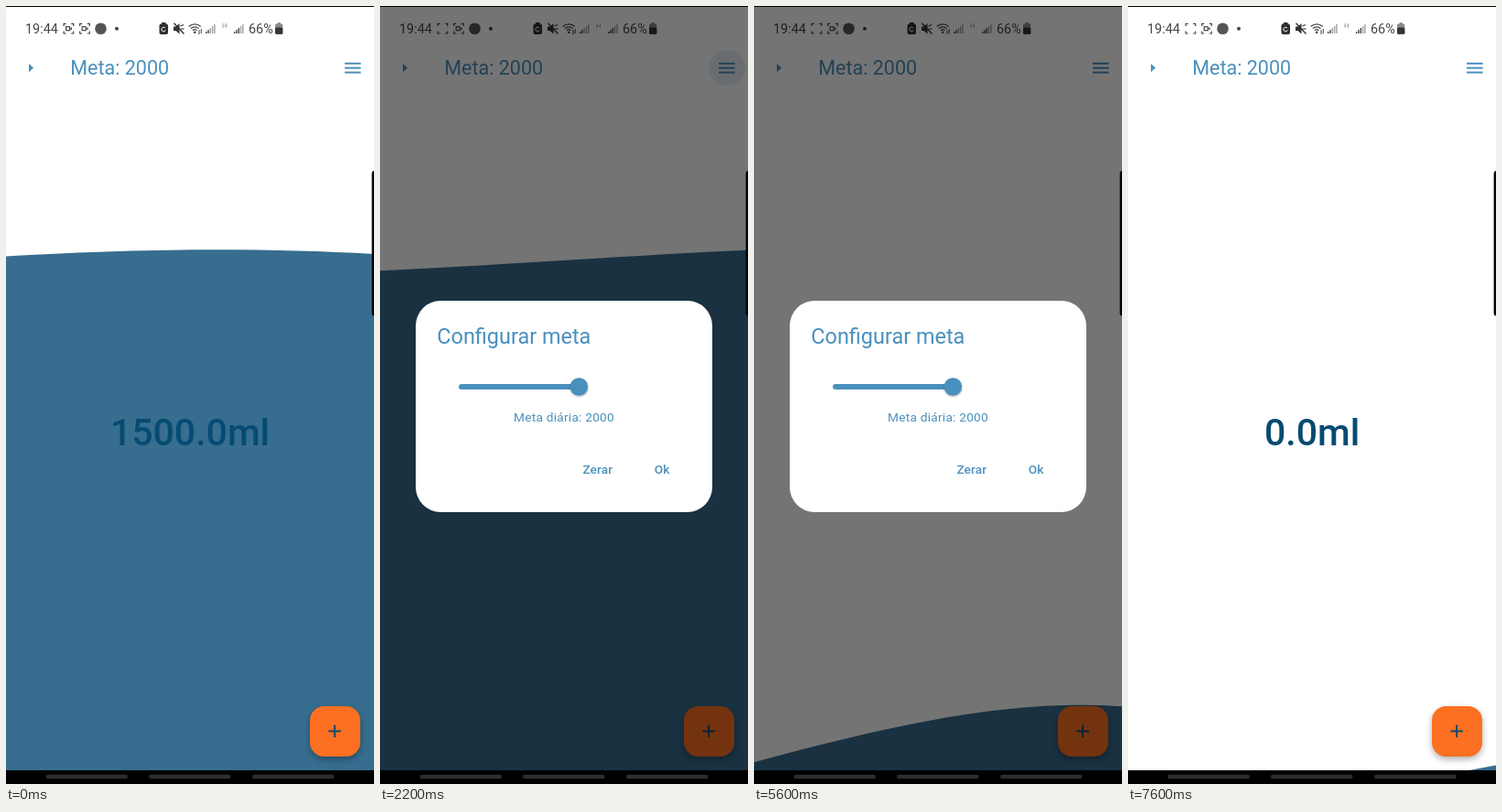
An HTML page with a canvas for the animation above (7.7 s loop, 402 by 850 pixels).

```html
<!DOCTYPE html>
<html lang="pt">
<head>
<meta charset="utf-8">
<title>Meta de água</title>
<style>
html, body { margin: 0; width: 100%; height: 100%; overflow: hidden; background: #fff; }
canvas { display: block; width: 402px; height: 850px; }
</style>
</head>
<body>
<canvas id="stage"></canvas>
<script>
const W = 402, H = 850, LOOP = 7700, STEP = 100;
const BLUE = '#4a90bd', NAVY = '#064b73', WATER = '#376d8f', INK = '#454545';
const RESET = 4100, OPEN = 2000, CLOSE = 6370, FADE = 150;

const canvas = document.getElementById('stage');
const ctx = canvas.getContext('2d');
const dpr = window.devicePixelRatio || 1;
canvas.width = W * dpr;
canvas.height = H * dpr;

const clamp = v => Math.max(0, Math.min(1, v));
const ramp = (t, from, len) => clamp((t - from) / len);
const smooth = f => f * f * (3 - 2 * f);
const easeOut = f => 1 - Math.pow(1 - f, 1.9);

// Surface handles: time of lowest value (s), then base and range when full and when empty
const handles = [
  { low: 0.23, full: [272, 22.5], empty: [798, 74] },
  { low: 0, full: [264.5, 31], empty: [764, 108] },
  { low: -0.25, full: [262, 32.3], empty: [754, 115] },
  { low: -0.5, full: [264, 27], empty: [764, 101] }
];

function rect(x, y, w, h, fill) {
  ctx.fillStyle = fill;
  ctx.fillRect(x, y, w, h);
}

function round(x, y, w, h, r, fill) {
  ctx.fillStyle = fill;
  ctx.beginPath();
  ctx.roundRect(x, y, w, h, r);
  ctx.fill();
}

function disc(x, y, r, fill) {
  ctx.fillStyle = fill;
  ctx.beginPath();
  ctx.arc(x, y, r, 0, Math.PI * 2);
  ctx.fill();
}

function poly(points, fill) {
  ctx.fillStyle = fill;
  ctx.beginPath();
  points.forEach(([x, y]) => ctx.lineTo(x, y));
  ctx.fill();
}

function line(x1, y1, x2, y2, color, width) {
  ctx.strokeStyle = color;
  ctx.lineWidth = width;
  ctx.beginPath();
  ctx.moveTo(x1, y1);
  ctx.lineTo(x2, y2);
  ctx.stroke();
}

function arc(x, y, r, a, b, width) {
  ctx.strokeStyle = INK;
  ctx.lineWidth = width;
  ctx.beginPath();
  ctx.arc(x, y, r, a, b);
  ctx.stroke();
}

function text(str, x, y, size, color, { weight = 400, align = 'left', gap = 0 } = {}) {
  ctx.font = `${weight} ${size}px Roboto, sans-serif`;
  ctx.letterSpacing = gap + 'px';
  ctx.textAlign = align;
  ctx.fillStyle = color;
  ctx.fillText(str, x, y);
}

function shadow(color, blur, dy) {
  ctx.shadowColor = color;
  ctx.shadowBlur = blur * dpr;
  ctx.shadowOffsetY = dy * dpr;
}

function water(t) {
  const [a, b, c, d] = handles.map(h => {
    const p = (((t / 1000 - h.low) % 3) + 3) % 3 / 1.5;
    const [base, range] = t < RESET ? h.full : h.empty;
    return base + range * smooth(p > 1 ? 2 - p : p);
  });
  ctx.fillStyle = WATER;
  ctx.beginPath();
  ctx.moveTo(0, a);
  ctx.bezierCurveTo(W * 0.4, b, W * 0.7, c, W, d);
  ctx.lineTo(W, 900);
  ctx.lineTo(0, 900);
  ctx.fill();
}

function captureIcon(x, inner) {
  ctx.strokeStyle = INK;
  ctx.lineWidth = 1.2;
  for (const sx of [-1, 1]) for (const sy of [-1, 1]) {
    ctx.beginPath();
    ctx.moveTo(x + sx * 5.3, 24.7 + sy * 2.8);
    ctx.lineTo(x + sx * 5.3, 24.7 + sy * 5.3);
    ctx.lineTo(x + sx * 2.8, 24.7 + sy * 5.3);
    ctx.stroke();
  }
  if (!inner) return;
  ctx.strokeRect(x - 2.8, 22.7, 4, 4);
  poly([[x + 1.5, 24.7], [x + 3.6, 22.9], [x + 3.6, 26.5]], INK);
}

function signal(x, strong) {
  for (let i = 0; i < 5; i++) {
    const h = 2 + i * 2;
    rect(x + i * 2.3, 30 - h, 1.4, h, i < strong ? INK : '#a2a2a2');
  }
}

function statusBar(t) {
  text('19:44', 21, 29.6, 14.4, INK);
  captureIcon(68.4, t < 1700 || (t >= 3300 && t < RESET));
  captureIcon(86, true);
  disc(103.5, 24.7, 6.3, '#555');
  disc(121, 24.8, 2, INK);

  round(167.5, 19.5, 9.5, 11.5, 2, '#2e2e2e');
  rect(170, 18, 4.5, 2, '#2e2e2e');
  arc(172.2, 25.5, 2.3, 0.4, 5.6, 1);
  ctx.strokeStyle = '#fff';
  ctx.stroke();

  poly([[183, 22.5], [185.5, 22.5], [189.5, 19], [189.5, 30.5], [185.5, 27], [183, 27]], '#333');
  line(183.5, 18.8, 194.5, 30.5, '#333', 1.4);
  line(190.5, 22, 194, 20.5, '#333', 1.1);
  line(190.5, 25, 194.5, 25, '#333', 1.1);

  for (const r of [3.2, 6.2, 9.2]) arc(206.2, 29, r, -2.35, -0.79, 1.3);
  disc(206.2, 28.8, 1.3, INK);
  line(211, 26, 211, 31, INK, 1);
  line(213.3, 25, 213.3, 30, INK, 1);

  signal(218, 2);
  text('H', 236, 23.8, 7.5, '#888');
  signal(249, 3);
  text('66%', 265, 29.6, 14.4, INK);
  rect(296.5, 18.3, 3.4, 2, '#777');
  round(294, 19.6, 8.3, 11.2, 1.5, '#8a8a8a');
  round(294, 23.4, 8.3, 7.4, 1.5, '#353535');
}

function ripple(t) {
  const grow = easeOut(ramp(t, 1800, 225));
  const fade = 1 - ramp(t, 2200, 250);
  if (grow && fade) disc(379, 67.5, 19.5 * grow, `rgba(74,144,191,${0.13 * fade})`);
}

function page(t) {
  rect(0, 0, W, H, '#fff');
  water(t);
  text(t < RESET ? '1500.0ml' : '0.0ml', 201, 479.6, 41, NAVY, { weight: 500, align: 'center' });
  statusBar(t);
  poly([[25, 63], [30, 67.6], [25, 72.2]], BLUE);
  text('Meta: 2000', 70.3, 74.7, 21.5, BLUE);
  ripple(t);
  for (const y of [61.8, 66.7, 71.6]) rect(370, y, 17.6, 2, BLUE);

  ctx.save();
  shadow('rgba(0,0,0,.32)', 7, 3);
  round(332, 765, 55, 55, 15.6, '#fd7021');
  ctx.restore();
  rect(352.3, 791.3, 13.6, 2, '#174a68');
  rect(358.1, 785.5, 2, 13.6, '#174a68');
}

function dialog(t) {
  round(39, 322, 324, 231, 27.4, '#fff');
  text('Configurar meta', 62.3, 369.2, 23.45, BLUE);
  round(86, 412.9, 132, 6, 3, BLUE);
  ctx.save();
  shadow('rgba(0,0,0,.3)', 2.5, 1);
  disc(217.4, 416, 9.8, BLUE);
  ctx.restore();
  text('Meta diária: 2000', 201, 454.4, 13.68, BLUE, { align: 'center', gap: 0.24 });

  const press = smooth(ramp(t, 3500, 200)) * (1 - ramp(t, RESET, 300));
  if (press) round(207, 487, 62, 39, 19.5, `rgba(74,144,191,${0.19 * press})`);
  text('Zerar', 221.4, 511, 13.68, BLUE, { weight: 500, gap: 0.1 });
  text('Ok', 299.8, 511, 13.68, BLUE, { weight: 500, gap: 0.1 });
}

function bezel() {
  round(399.6, 180, 8, 158.5, 3, '#000');
  rect(0, 0, W, 1, '#000');
  rect(0, 835, W, 15, '#000');
  for (const x of [43.5, 156, 269]) round(x, 839.8, 89.5, 4.4, 2.2, '#2f2c2d');
}

function draw(t) {
  ctx.setTransform(dpr, 0, 0, dpr, 0, 0);
  page(t);
  const shown = easeOut(Math.min(ramp(t, OPEN, FADE), 1 - ramp(t, CLOSE, FADE)));
  if (shown > 0) {
    rect(0, 0, W, H, `rgba(0,0,0,${0.545 * shown})`);
    ctx.globalAlpha = shown;
    dialog(t);
    ctx.globalAlpha = 1;
  }
  bezel();
}

const start = performance.now();
function tick() {
  const t = (performance.now() - start) % LOOP;
  draw(Math.floor(t / STEP) * STEP);
  requestAnimationFrame(tick);
}
tick();
</script>
</body>
</html>
```
